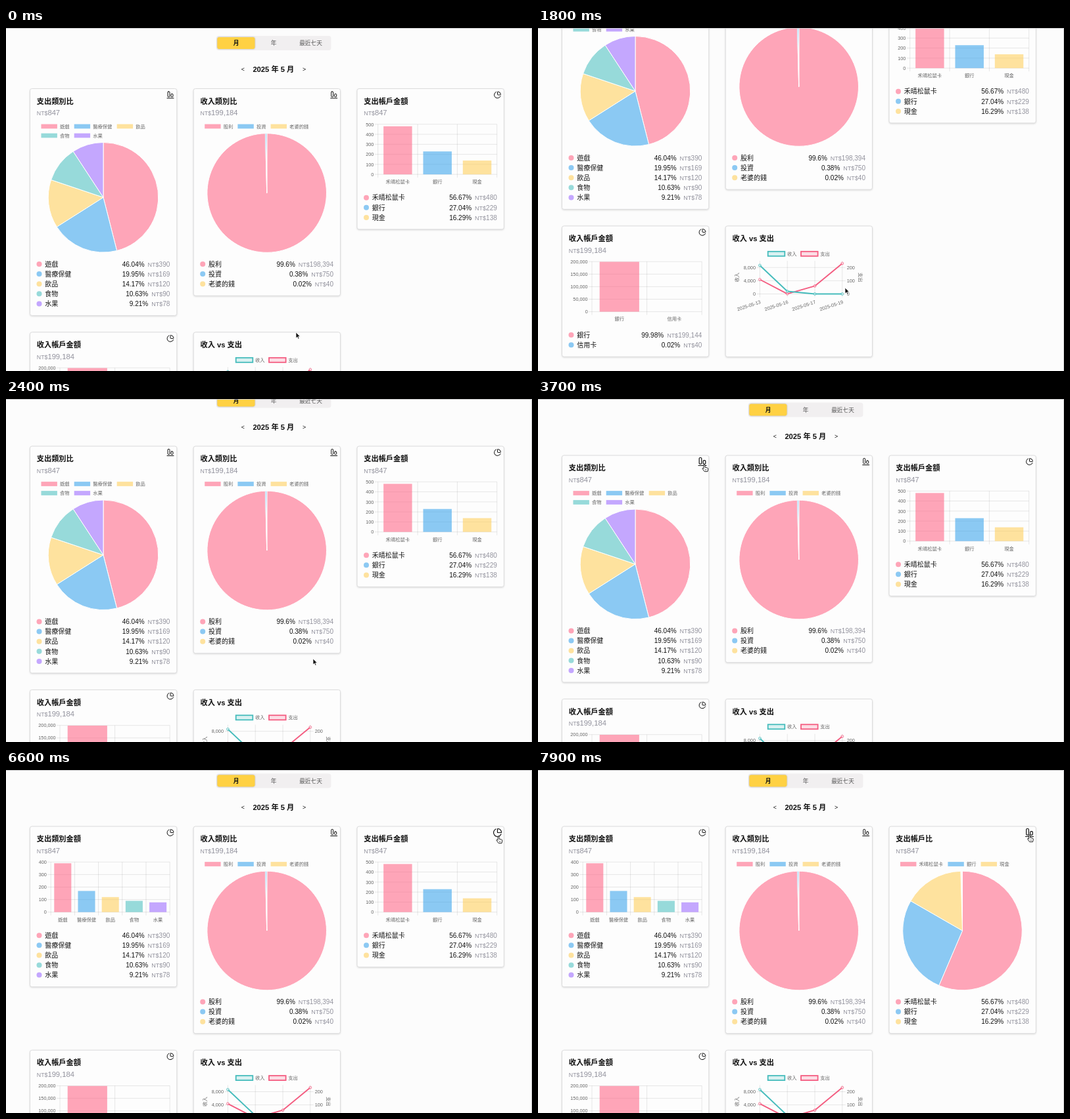
An HTML page for the animation above (8000 ms loop, 800 by 523 pixels).

```html
<!DOCTYPE html>
<html lang="zh-Hant">
<head>
<meta charset="utf-8">
<title>記帳圖表</title>
<style>
  html, body { margin: 0; width: 100%; height: 100%; overflow: hidden; background: #fcfcfc; }
  svg { display: block; width: 100%; height: 100%; }
  text { font-family: "Liberation Sans", "Noto Sans CJK TC", "Noto Sans CJK", sans-serif; white-space: pre; }
  .card { fill: #fdfdfd; stroke: #dcdcdd; filter: drop-shadow(0 1px 1px rgba(0, 0, 0, .13)); }
  .grid { stroke: #000; stroke-opacity: .13; stroke-width: .7; fill: none; }
  .icon { stroke: #111; stroke-width: 2; stroke-linecap: round; stroke-linejoin: round; fill: none; }
</style>
</head>
<body>
<svg id="stage" viewBox="0 0 800 523" xmlns="http://www.w3.org/2000/svg"></svg>
<script>
const LOOP = 8000, STEP = 100;
const COLORS = ['rgb(255,99,132)', 'rgb(54,162,235)', 'rgb(255,206,86)', 'rgb(75,192,192)', 'rgb(153,102,255)'];
const ALPHA = .57, TEAL = '#45bcbc', ROSE = '#f45c80';
const COLS = [36.5, 285.2, 534], TOP = 92.5, GAP = 25.5, WIDTH = 223.3, ROW = 15.1;

// [time, value...]
const SCROLL = [[0, 0], [200, 2], [300, 10], [500, 55], [700, 111.5], [900, 146], [1100, 160], [1200, 162],
  [1800, 162], [1900, 156], [2050, 118], [2200, 62], [2400, 20.5], [2550, 10], [2700, 6.5]];
const POINTER = [[0, 441, 464], [350, 466, 396.5], [1200, 466, 396.5], [1400, 467, 396], [2700, 467, 396],
  [3500, 253, 100], [4500, 253, 100], [5300, 762, 106], [5600, 761, 104], [6000, 750, 101],
  [6200, 750, 101], [6300, 749, 101], [7000, 749, 101], [7400, 747.5, 99]];
const HOVERS = [[3500, 4600], null, [6000, LOOP]];

const cards = [
  { name: '支出類別', sum: 847, kind: 'pie', flip: 4200, max: 400, tick: 100,
    data: [['遊戲', 390], ['醫療保健', 169], ['飲品', 120], ['食物', 90], ['水果', 78]] },
  { name: '收入類別', sum: 199184, kind: 'pie',
    data: [['股利', 198394, '99.6%'], ['投資', 750], ['老婆的錢', 40]] },
  { name: '支出帳戶', sum: 847, kind: 'bar', flip: 7160, max: 500, tick: 100,
    data: [['禾晴松鼠卡', 480], ['銀行', 229], ['現金', 138]] },
  { name: '收入帳戶', sum: 199184, kind: 'bar', max: 200000, tick: 50000,
    data: [['銀行', 199144], ['信用卡', 40]] }
];

const num = n => n.toLocaleString('en-US');
const clamp = v => Math.max(0, Math.min(1, v));
const outQuart = v => 1 - (1 - clamp(v)) ** 4;

function at(table, t, smooth) {
  let i = table.findIndex(k => k[0] > t);
  if (i < 0) return table[table.length - 1].slice(1);
  const a = table[i - 1], b = table[i];
  let p = (t - a[0]) / (b[0] - a[0]);
  if (smooth) p = p * p * (3 - 2 * p);
  return a.slice(1).map((v, j) => v + (b[j + 1] - v) * p);
}

// y is the middle of the line
function text(x, y, size, str, { fill = '#111', anchor = 'start', bold = false, turn = 0 } = {}) {
  return `<text x="${x}" y="${y + size * .37}" font-size="${size}" fill="${fill}" text-anchor="${anchor}"` +
    `${bold ? ' font-weight="700"' : ''}${turn ? ` transform="rotate(${turn} ${x} ${y})"` : ''}>${str}</text>`;
}
const small = (x, y, str, anchor, turn) => text(x, y, 7.3, str, { fill: '#666', anchor, turn });
const rect = (x, y, w, h, fill, more = '') =>
  `<rect x="${x}" y="${y}" width="${w}" height="${h}" fill="${fill}" ${more}/>`;
const grid = d => `<path class="grid" d="${d}"/>`;
const money = (n, size) => `<tspan font-size="${size}">NT$</tspan>${num(n)}`;

function frame(h, title) {
  return `<rect class="card" width="${WIDTH}" height="${h}" rx="3"/>` +
    text(10.3, 19, 11.2, title, { bold: true });
}

function icon(kind, scale) {
  const d = kind === 'pie'
    ? '<rect x="4" y="2" width="6" height="16" rx="2"/><rect x="14" y="9" width="6" height="9" rx="2"/><path d="M2 22H22"/>'
    : '<path d="M21 12a1 1 0 0 0 1-1A10 10 0 0 0 13 2a1 1 0 0 0-1 1v8a1 1 0 0 0 1 1z"/><path d="M21.2 15.9A10 10 0 1 1 8 2.8"/>';
  return `<g class="icon" transform="translate(213.5 9.5) scale(${.5 * scale}) translate(-12 -12)">${d}</g>`;
}

function pie(card, p) {
  const two = card.data.length > 3;
  const cx = 111.5, cy = two ? 165.8 : 159, r = two ? 83.8 : 90.8;
  const total = card.data.reduce((s, d) => s + d[1], 0);
  let out = '', x = 17, angle = 0;
  card.data.forEach(([label, value], i) => {
    if (i === 3) x = 17;
    const y = i < 3 ? 57.5 : 71.5;
    out += rect(x, y - 3.4, 24.4, 6.8, COLORS[i], `fill-opacity="${ALPHA}"`) + small(x + 28.5, y, label);
    x += 35.4 + 7.4 * label.length;
  });
  card.data.forEach(([, value], i) => {
    const sweep = value / total * 2 * Math.PI * p, end = angle + sweep;
    const point = a => `${cx + r * Math.sin(a)} ${cy - r * Math.cos(a)}`;
    const d = `M${cx} ${cy}L${point(angle)}A${r} ${r} 0 ${sweep > Math.PI ? 1 : 0} 1 ${point(end)}Z`;
    out += `<path d="${d}" fill="${COLORS[i]}" fill-opacity="${ALPHA}" stroke="#fff" stroke-width="1" stroke-linejoin="round"/>`;
    angle = end;
  });
  return out;
}

function bars(card, p) {
  const { data, max, tick } = card;
  const left = max > 1000 ? 45.5 : 31.7, right = 212.7, top = 54.3, base = 130.7;
  const cat = (right - left) / data.length;
  let lines = '', out = '';
  for (let v = 0; v <= max; v += tick) {
    const y = base - (base - top) * v / max;
    lines += `M${left - 5} ${y}H${right}`;
    out += small(left - 6.3, y, num(v), 'end');
  }
  for (let i = 0; i <= data.length; i++) lines += `M${left + cat * i} ${top}V${base + 5}`;
  out += grid(lines);
  data.forEach(([label, value], i) => {
    const h = (base - top) * value / max * p;
    out += rect(left + cat * (i + .14), base - h, cat * .72, h, COLORS[i], `fill-opacity="${ALPHA}"`);
    out += small(left + cat * (i + .5), 141.8, label, 'middle');
  });
  return out;
}

const rowTop = kind => kind === 'pie' ? 267.5 : 166.2;
const height = (card, kind) => rowTop(kind) + (card.data.length - 1) * ROW + 18;

function drawCard(card, kind, p, scale) {
  const total = card.data.reduce((s, d) => s + d[1], 0);
  let out = frame(height(card, kind), card.name + (kind === 'pie' ? '比' : '金額'));
  out += text(10.3, 36.7, 11.2, money(card.sum, 8.8), { fill: '#92929d' });
  out += icon(kind, scale) + (kind === 'pie' ? pie : bars)(card, p);
  card.data.forEach(([label, value, share], i) => {
    const y = rowTop(kind) + i * ROW;
    out += `<circle cx="14" cy="${y}" r="4" fill="${COLORS[i]}" fill-opacity="${ALPHA}"/>` + text(22.8, y, 10, label);
    out += text(212.8, y, 10, `${share || (value / total * 100).toFixed(2) + '%'}` +
      `<tspan dx="5" fill="#92929d" font-size="9">NT$</tspan><tspan fill="#92929d">${num(value)}</tspan>`, { anchor: 'end' });
  });
  return out;
}

function drawLines() {
  const xs = [52.2, 94, 135.8, 177.6], base = 103.6, top = 53.2;
  let out = frame(199.5, '收入 vs 支出'), lines = '';
  [[64.5, '收入', TEAL], [114.8, '支出', ROSE]].forEach(([x, label, color]) => {
    out += rect(x, 38.9, 25.6, 7, color, `fill-opacity=".2" stroke="${color}" stroke-width="1.8"`);
    out += small(x + 29.2, 42.4, label);
  });
  for (let i = 0; i < 3; i++) {
    const y = base - i * 20.16;
    lines += `M47.5 ${y}H182.5`;
    out += small(45.8, y, num(i * 4000), 'end') + small(184.5, y, i * 100);
  }
  xs.forEach((x, i) => {
    lines += `M${x} ${top}V${base + 5}`;
    out += small(x + 1, 115.4, '2025-05-' + [13, 16, 17, 19][i], 'end', -18);
  });
  out += grid(lines) + small(17.5, 78.4, '收入', 'middle', -90) + small(205.5, 78.4, '支出', 'middle', 90);
  [[[109, 1, 60, 231], 250, ROSE], [[8640, 790, 0, 0], 10000, TEAL]].forEach(([vals, max, color]) => {
    const pts = vals.map((v, i) => [xs[i], base - (base - top) * v / max]);
    out += `<polyline points="${pts.join(' ')}" fill="none" stroke="${color}" stroke-width="1.9" stroke-linejoin="round"/>`;
    out += pts.map(([x, y]) => `<circle cx="${x}" cy="${y}" r="1.9" fill="#fff" fill-opacity=".45" stroke="${color}" stroke-width=".8"/>`).join('');
  });
  return out;
}

function drawHeader() {
  const shade = 'style="filter:drop-shadow(0 .5px 1px rgba(0,0,0,.25))"';
  const mid = { anchor: 'middle' };
  return rect(320, 12, 174.5, 22, '#f1eff0', 'rx="4"') + rect(321.3, 14, 57.2, 18, '#ffd143', `rx="3" ${shade}`) +
    text(350, 23, 8.7, '月', { ...mid, bold: true }) +
    text(407, 23, 8.7, '年', { ...mid, fill: '#555' }) +
    text(463.5, 23, 8.7, '最近七天', { ...mid, fill: '#555' }) +
    text(360.2, 63, 8.8, '&lt;', mid) + text(453.5, 63, 8.8, '&gt;', mid) +
    text(406.8, 63, 11.2, '2025 年 5 月', { ...mid, bold: true });
}

const ARROW = '<path d="M0 0V9L2.1 7.1L3.5 10.3L5 9.6L3.6 6.5H6.3Z" fill="#111" stroke="#fff" stroke-width=".7"/>';
const HAND = '<path d="M-1 1Q-1-.2 0-.2T1 1V4.1L4.6 5Q6 5.4 5.8 7L5 10.6H.2L-2.8 6.6Q-3.3 5.2-1.9 5.4L-1 6.3Z" ' +
  'fill="#fff" stroke="#111" stroke-width=".9" stroke-linejoin="round"/><path d="M1.4 7V9M2.9 7V9" stroke="#111" stroke-width=".5"/>';

const stage = document.getElementById('stage');
stage.innerHTML = '<g id="page">' + drawHeader() +
  cards.map((c, i) => `<g id="card${i}"></g>`).join('') + `<g id="lines">${drawLines()}</g></g>` +
  rect(0, 0, 800, 1, '#c4c4c6') + rect(799, 0, 1, 523, '#cfcfd1') + '<g id="pointer"></g>';
const el = id => document.getElementById(id);
const move = (node, x, y) => node.setAttribute('transform', `translate(${x} ${y})`);
const shown = {};

// Rewrites a group only when its content differs
function fill(id, key, make) {
  if (shown[id] === key) return;
  shown[id] = key;
  el(id).innerHTML = make();
}

function render(t) {
  let tallest = 0;
  const states = cards.map((card, i) => {
    const flipped = card.flip !== undefined && t >= card.flip;
    const kind = flipped ? (card.kind === 'pie' ? 'bar' : 'pie') : card.kind;
    if (i < 3) tallest = Math.max(tallest, height(card, kind));
    const h = HOVERS[i];
    const scale = h ? 1 + .2 * Math.min(clamp((t - h[0]) / 150), clamp((h[1] + 150 - t) / 150)) : 1;
    return { kind, scale, p: flipped ? outQuart((t - card.flip) / 1000) : 1 };
  });
  const second = TOP + tallest + GAP;
  states.forEach(({ kind, p, scale }, i) => {
    fill('card' + i, [kind, p, scale].join(), () => drawCard(cards[i], kind, p, scale));
    move(el('card' + i), COLS[i % 3], i < 3 ? TOP : second);
  });
  move(el('lines'), COLS[1], second);
  move(el('page'), 0, -at(SCROLL, t)[0]);
  const hand = HOVERS.some(h => h && t >= h[0] && t < h[1]);
  fill('pointer', hand, () => hand ? HAND : ARROW);
  move(el('pointer'), ...at(POINTER, t, true));
}

const start = performance.now();
function tick() {
  const t = (performance.now() - start) % LOOP;
  render(Math.floor(t / STEP) * STEP);
  requestAnimationFrame(tick);
}
tick();
</script>
</body>
</html>
```
